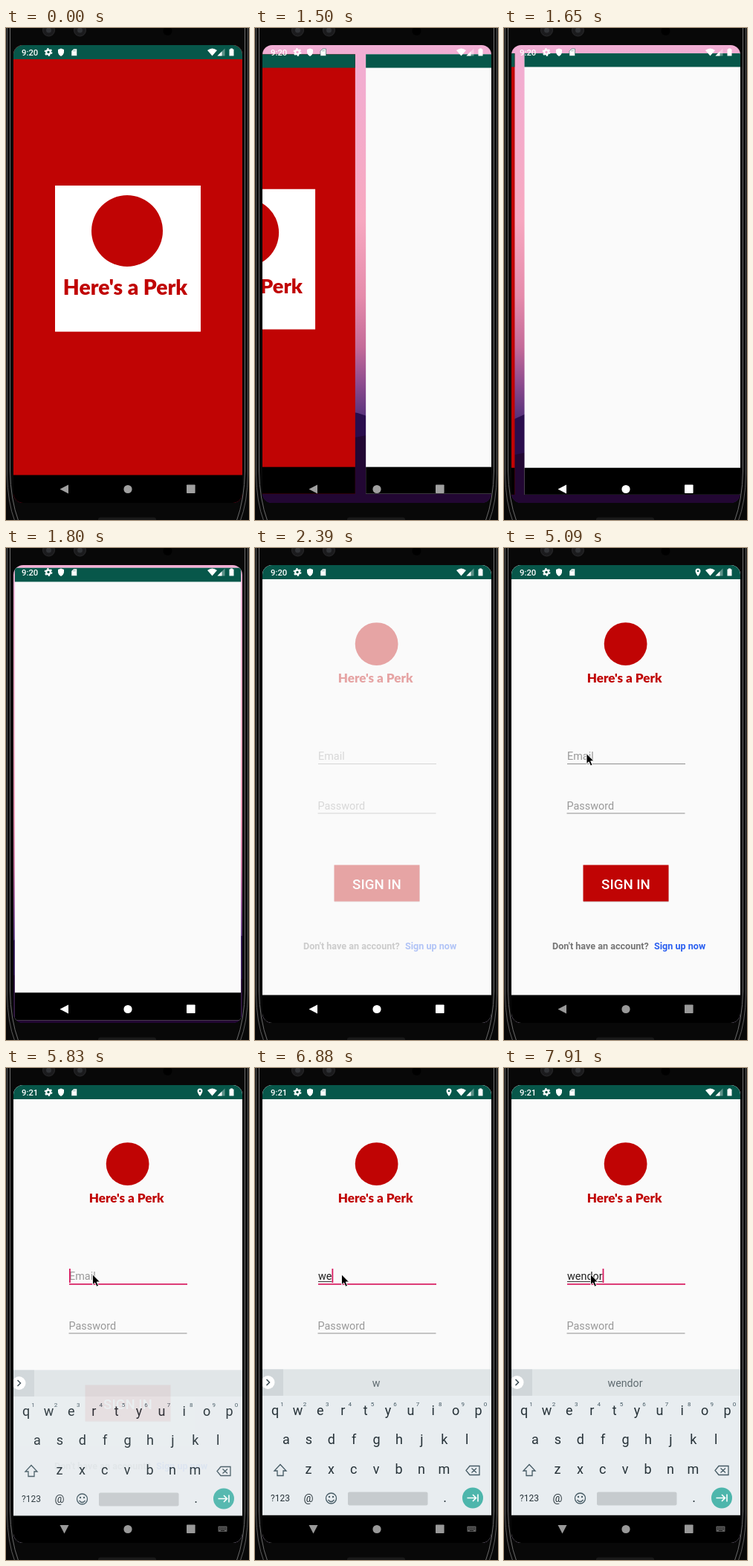
Animation, 327 px wide and 662 px high, one loop 8 s. Source, as an HTML page:

```html
<!DOCTYPE html>
<html lang="en">
<head>
<meta charset="utf-8">
<title>Sign in</title>
<style>
html, body { margin: 0; width: 100%; height: 100%; overflow: hidden; background: #060606; }
svg { display: block; width: 100vw; height: 100vh; }
text { font-family: Roboto, "Liberation Sans", sans-serif; white-space: pre; }
.brand { font: 900 28.3px Lato, "Open Sans", sans-serif; fill: #c00404; }
.field { font-size: 14.4px; }
.foot { font-size: 12.6px; font-weight: 700; }
.mid { text-anchor: middle; }
.key { font-size: 18px; fill: #263238; text-anchor: middle; }
.digit { font-size: 8px; fill: #455a64; text-anchor: middle; }
</style>
</head>
<body>
<svg viewBox="0 0 327 662" preserveAspectRatio="none">
  <defs>
    <linearGradient id="sky" x1="0" y1="0" x2="0" y2="1">
      <stop offset="0" stop-color="#f1aed4"/>
      <stop offset=".38" stop-color="#f7a8c0"/>
      <stop offset=".55" stop-color="#e58bab"/>
      <stop offset=".66" stop-color="#c46b99"/>
      <stop offset=".74" stop-color="#8d4b8e"/>
      <stop offset=".82" stop-color="#53307a"/>
      <stop offset="1" stop-color="#2e1052"/>
    </linearGradient>
    <clipPath id="screen"><rect x="10" y="23" width="308" height="616" rx="13"/></clipPath>
    <clipPath id="above"><rect x="10" y="23" width="308" height="580"/></clipPath>
    <g id="logo">
      <circle cx="163" cy="273" r="48" fill="#c00404"/>
      <text class="brand mid" x="160.5" y="358.5">Here's a Perk</text>
    </g>
    <g id="bars">
      <rect x="10" y="23" width="308" height="19" fill="#07574a"/>
      <rect x="10" y="601.5" width="308" height="37.5"/>
    </g>
  </defs>

  <!-- phone body -->
  <rect width="327" height="662" fill="#080808"/>
  <g fill="none">
    <path d="M1.5 0V600Q2 638 12 664M325.5 0V600Q325 638 315 664" stroke="#5c5c5c"/>
    <path d="M5.5 0V596Q6 634 17 664M321.5 0V596Q321 634 310 664" stroke="#6c6c6c"/>
  </g>
  <g fill="#1b1b1d" stroke="#29292b">
    <circle cx="57.5" cy="3" r="8"/><circle cx="99.5" cy="3" r="8"/>
  </g>
  <g fill="#303236"><circle cx="57.5" cy="3" r="3.5"/><circle cx="99.5" cy="3" r="3.5"/></g>
  <circle cx="217.5" cy="4" r="6" fill="#000"/>
  <rect x="124" y="658.5" width="78" height="6" rx="3" fill="#191919"/>

  <g clip-path="url(#screen)">
    <rect x="10" y="23" width="308" height="616" fill="url(#sky)"/>
    <path d="M10 528L60 505L138 518L190 535L250 512L318 522V639H10Z" fill="#2a0d4d"/>
    <path d="M10 575L150 548L318 580V639H10Z" fill="#220733"/>

    <g id="splash">
      <rect x="10" y="23" width="308" height="616" fill="#c00404"/>
      <use href="#bars"/>
      <rect x="66" y="212" width="196" height="196.6" fill="#fff"/>
      <use href="#logo"/>
    </g>

    <g id="login">
      <rect x="10" y="23" width="308" height="616" fill="#fafafa"/>
      <use href="#bars"/>
      <g id="form">
        <use href="#logo" transform="translate(65.5 -35.3) scale(.602)"/>
        <text id="email" class="field" x="85" y="285"></text>
        <rect id="compose" x="85" y="287" height="1" fill="#333"/>
        <rect id="line" x="85" y="290" width="159"/>
        <rect id="caret" y="270" width="1.8" height="19" fill="#d81b60"/>
        <text class="field" x="84.5" y="351.5" fill="#999">Password</text>
        <rect x="84.5" y="356.5" width="159" height="1" fill="#8f8f8f"/>
        <rect x="107" y="428.5" width="114.5" height="48" opacity=".16"/>
        <rect x="106.5" y="426.5" width="115" height="49" fill="#c00404"/>
        <text class="mid" x="164" y="458.5" font-size="18.7" font-weight="500" fill="#fff">SIGN IN</text>
        <text class="foot" x="65" y="540" fill="#757575">Don't have an account?</text>
        <text class="foot" x="202" y="540" fill="#2a5ff0">Sign up now</text>
      </g>
    </g>

    <g clip-path="url(#above)">
      <g id="board">
        <rect x="10" y="405.5" width="308" height="196" fill="#e8edf0"/>
        <rect x="10" y="405.5" width="308" height="35.5" fill="#e0e5e7"/>
        <rect x="10" y="405.5" width="28" height="35.5" fill="#d0d6d9"/>
        <circle cx="17.5" cy="423" r="9" fill="#fff"/>
        <path d="M15.5 419L19.5 423L15.5 427" fill="none" stroke="#37474f" stroke-width="1.5"/>
        <text id="hint" class="mid" x="163" y="429" font-size="14.2" fill="#5f6b70"></text>
        <g id="keys"></g>
        <g fill="none" stroke="#455a64" stroke-width="1.3">
          <path d="M34 533.5L42 542H38V548.5H30V542H26Z"/>
          <path d="M289 535.5H302V547.5H289L284 541.5ZM291.5 538.5L298 544.5M298 538.5L291.5 544.5"/>
          <circle cx="102.5" cy="579" r="7"/>
          <path d="M98.5 581Q102.5 586 106.5 581"/>
        </g>
        <g fill="#455a64"><circle cx="100" cy="577" r="1.2"/><circle cx="105" cy="577" r="1.2"/></g>
        <rect x="125" y="570.5" width="107.5" height="18" rx="2" fill="#c6cbce"/>
        <circle cx="293" cy="578.5" r="14" fill="#4db6ac"/>
        <path d="M285.5 578.5H297M293 574L297.5 578.5L293 583M300 573.5V583.5" fill="none" stroke="#fff" stroke-width="1.6"/>
      </g>
    </g>

    <!-- status icons -->
    <g fill="#fff">
      <text id="clock" x="21" y="37" font-size="11.3" font-weight="500"></text>
      <circle cx="57" cy="32.5" r="2.8" fill="none" stroke="#fff" stroke-width="2.2"/>
      <circle cx="57" cy="32.5" r="4.6" fill="none" stroke="#fff" stroke-width="1.6" stroke-dasharray="2.4 2.42"/>
      <path d="M74 27.5L78 29V32.5Q77.5 36 74 38Q70.5 36 70 32.5V29Z"/>
      <path d="M91 28H95.5V37.5H88V31ZM91 29.5V31.5M93 29.5V31.5" stroke="#07574a" stroke-width=".5"/>
      <path id="pin" fill-rule="evenodd" d="M261 27.5A3.5 3.5 0 0 1 264.5 31Q264.3 33.5 261 38Q257.7 33.5 257.5 31A3.5 3.5 0 0 1 261 27.5ZM261 29.7A1.3 1.3 0 0 0 261 32.3A1.3 1.3 0 0 0 261 29.7Z"/>
      <path d="M271 30Q277.5 25 284 30L277.5 37.5Z"/>
      <path d="M294.5 27.5V37.5H284.5Z" opacity=".35"/>
      <path d="M290.5 31.5V37.5H284.5Z"/>
      <path d="M302 27.5H305V28.5H306.5V37.5H300.5V28.5H302Z"/>
    </g>
    <!-- navigation -->
    <g id="nav">
      <path id="back" d="M72.5 620.5L84 614.5V626.5Z"/>
      <circle cx="164" cy="620.5" r="5.6"/>
      <rect x="243" y="614.5" width="11.6" height="11.6" rx=".8"/>
      <g id="swap">
        <rect x="285.5" y="616.5" width="12" height="7.5" rx=".8"/>
        <path d="M287 618.7H296M287 620.5H296" stroke="#000" stroke-width=".9" stroke-dasharray="1 1"/>
        <path d="M289 622.5H294" stroke="#000" stroke-width=".8"/>
      </g>
    </g>
    <path id="mouse" d="M0 0V14L3.2 11.2L5.5 16.5L8 15.4L5.7 10.2H10Z" fill="#000" stroke="#fff" stroke-width=".9"/>
  </g>
</svg>
<script>
const LOOP = 8000;
const $ = id => document.getElementById(id);
const set = (id, attrs) => { for (const k in attrs) $(id).setAttribute(k, attrs[k]); };

// Each step changes only the listed values and keeps the rest.
const steps = [
  [0, { clock: '9:20', zoom: 1, old: 0, win: null, form: 0, pin: 0, nav: '#a0a0a0', mouse: null,
        focus: 0, board: 0, drop: 0, turn: 0, email: '', hint: '' }],
  [1500, { zoom: .96, old: -177, win: 133 }],
  [1650, { zoom: .964, old: -298, win: 12, nav: '#fff' }],
  [1800, { zoom: .988, old: null, win: 0 }],
  [1940, { zoom: 1 }],
  [2390, { form: .35 }],
  [2540, { form: .78, pin: 1 }],
  [2690, { form: 1, nav: '#eee' }],
  [2990, { nav: '#c8c8c8', mouse: [306, 392] }],
  [3140, { nav: '#aaa', mouse: [204, 322] }],
  [3290, { nav: '#999', mouse: [126, 284] }],
  [3440, { mouse: [104.5, 275] }],
  [5090, { mouse: [111, 276.5] }],
  [5240, { mouse: [116.5, 277.7] }],
  [5530, { focus: 1, clock: '9:21' }],
  [5680, { board: .4, drop: 10, turn: -50 }],
  [5830, { board: .94, drop: 1, turn: -90 }],
  [5980, { board: 1, drop: 0 }],
  [6430, { email: 'w' }],
  [6580, { hint: 'w' }],
  [6880, { email: 'we' }],
  [7020, { hint: 'we' }],
  [7470, { email: 'wend', hint: 'wend' }],
  [7760, { email: 'wendo', hint: 'wendo', pin: 0 }],
  [7910, { email: 'wendor', hint: 'wendor' }]
];
let state = {};
const states = steps.map(([at, change]) => [at, state = { ...state, ...change }]);

function label(cls, x, y, str, size) {
  const el = document.createElementNS('http://www.w3.org/2000/svg', 'text');
  el.setAttribute('class', cls);
  el.setAttribute('x', x);
  el.setAttribute('y', y);
  if (size) el.style.fontSize = size + 'px';
  el.textContent = str;
  $('keys').append(el);
}
[['qwertyuiop', 27, 466.6], ['asdfghjkl', 42, 506], ['zxcvbnm', 72, 546]].forEach(([row, x, y], r) =>
  [...row].forEach((ch, i) => {
    label('key', x + i * 30.4, y, ch);
    if (!r) label('digit', x + i * 30.4 + 9.5, y - 12, (i + 1) % 10);
  }));
label('key', 34, 583, '?123', 12);
label('key', 72, 583.5, '@', 14.5);
label('key', 255.5, 584, '.');

function place(id, dx, zoom) {
  set(id, dx === null ? { display: 'none' } : {
    display: 'inline',
    transform: `translate(${164 + dx} 331) scale(${zoom}) translate(-164 -331)`
  });
}

function draw(s) {
  place('splash', s.old, s.zoom);
  place('login', s.win, s.zoom);
  set('form', { opacity: s.form });
  $('clock').textContent = s.clock;
  set('pin', { opacity: s.pin });
  set('nav', { fill: s.nav });
  set('back', { transform: `rotate(${s.turn} 78.5 620.5)` });
  set('swap', { opacity: s.turn === -90 ? .6 : 0 });
  set('board', { opacity: s.board, transform: `translate(0 ${s.drop})` });
  $('hint').textContent = s.hint;
  $('email').textContent = s.email || 'Email';
  set('email', { fill: s.email ? '#212121' : '#999' });
  const w = s.email ? $('email').getComputedTextLength() : 0;
  set('compose', { width: w });
  set('caret', { x: 85 + w, opacity: s.focus });
  set('line', s.focus ? { height: 1.7, fill: '#d81b60' } : { height: 1, fill: '#8f8f8f' });
  set('mouse', s.mouse
    ? { display: 'inline', transform: `translate(${s.mouse})` }
    : { display: 'none' });
}

const start = performance.now();
let shown;
function tick(now) {
  const t = Math.max(0, now - start) % LOOP;
  const next = states.filter(([at]) => at <= t).pop()[1];
  if (next !== shown) draw(shown = next);
  requestAnimationFrame(tick);
}
tick(start);
</script>
</body>
</html>
```
